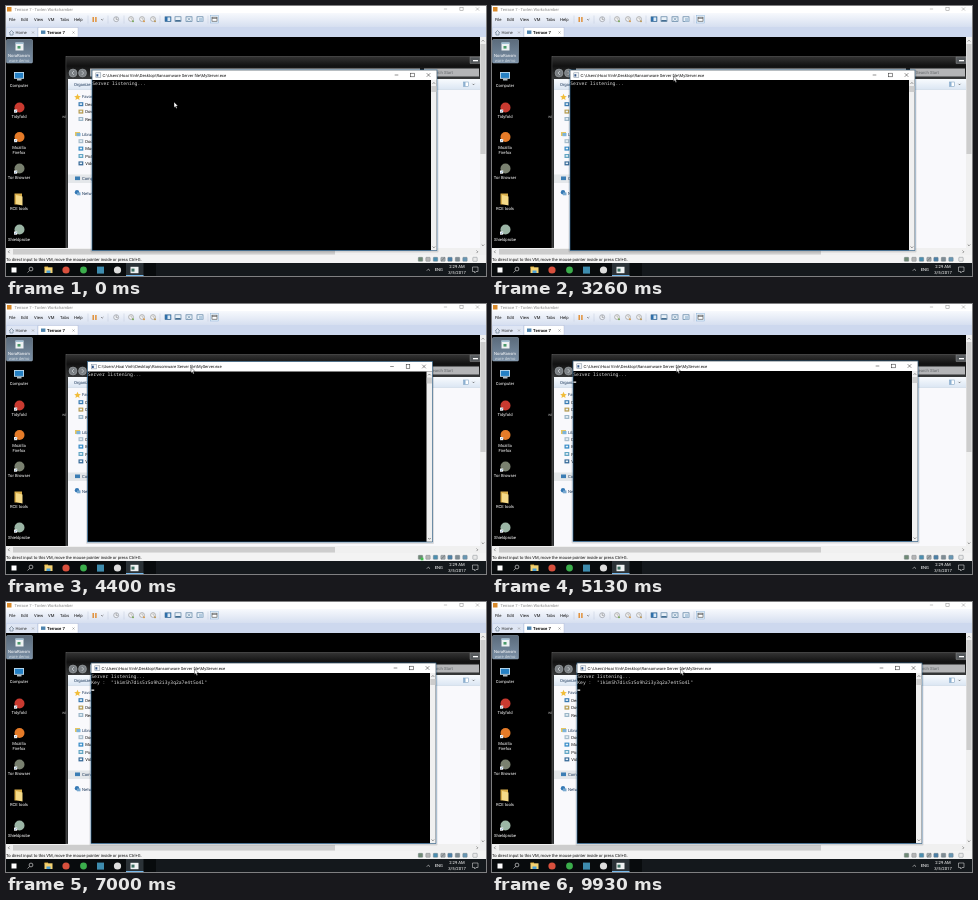
Recreate the animation shown at these times as an HTML page. Size 480 px wide and 270 px high, loop 10 s.

```html
<!DOCTYPE html>
<html lang="en">
<head>
<meta charset="utf-8">
<title>Server console on a virtual desktop</title>
<style>
  html, body { margin: 0; width: 100%; height: 100%; overflow: hidden; background: #000; }
  svg { display: block; width: 100vw; height: 100vh; }
  text { font: 4.2px Roboto, sans-serif; text-rendering: geometricPrecision; white-space: pre; }
  .mono { font: 4.72px "Noto Sans Mono", monospace; }
</style>
</head>
<body>
<svg id="stage" viewBox="0 0 480 270">
  <defs>
    <linearGradient id="glass" x2="0" y2="1">
      <stop offset="0" stop-color="#333"/>
      <stop offset=".4" stop-color="#111"/>
      <stop offset="1" stop-color="#3a3c3d"/>
    </linearGradient>
    <linearGradient id="menu" x2="0" y2="1">
      <stop offset="0" stop-color="#f7f9fd"/>
      <stop offset="1" stop-color="#d6dff0"/>
    </linearGradient>
    <linearGradient id="bar" x2="0" y2="1">
      <stop offset="0" stop-color="#f8fbfe"/>
      <stop offset="1" stop-color="#dbe6f3"/>
    </linearGradient>
    <linearGradient id="picked" x2="0" y2="1">
      <stop offset="0" stop-color="#5b6b7b"/>
      <stop offset="1" stop-color="#7b90a6"/>
    </linearGradient>
  </defs>
</svg>
<script>
const LOOP = 10000;
const stage = document.getElementById('stage');

function add(parent, tag, attrs, content) {
  const node = document.createElementNS('http://www.w3.org/2000/svg', tag);
  for (const key in attrs) node.setAttribute(key, attrs[key]);
  if (content) node.textContent = content;
  return parent.appendChild(node);
}
const rect = (p, x, y, width, height, fill, more) =>
  add(p, 'rect', { x, y, width, height, fill, ...more });
const dot = (p, cx, cy, r, fill, more) => add(p, 'circle', { cx, cy, r, fill, ...more });
const line = (p, d, stroke, width = 0.6, fill = 'none') =>
  add(p, 'path', { d, stroke, fill, 'stroke-width': width });
const label = (p, x, y, content, fill = '#111', more) =>
  add(p, 'text', { x, y, fill, ...more }, content);
const centred = (p, x, y, content, fill) => label(p, x, y, content, fill, { 'text-anchor': 'middle' });
const cross = (p, x, y, r, stroke, width) =>
  line(p, `M${x - r} ${y - r}l${2 * r} ${2 * r}m0 ${-2 * r}l${-2 * r} ${2 * r}`, stroke, width);

function windowButtons(p, x, y, gap, r, stroke) {
  line(p, `M${x - r} ${y}h${2 * r}`, stroke, 0.5);
  rect(p, x + gap - r, y - r, 2 * r, 2 * r, 'none', { stroke, 'stroke-width': 0.5 });
  cross(p, x + 2 * gap, y, r, stroke, 0.5);
}

function folder(p, x, y, w, h) {
  rect(p, x, y, w * 0.45, 1.5, '#d6a534');
  rect(p, x, y + 0.8, w, h - 0.8, '#f3d171');
}

function drawHost() {
  const g = add(stage, 'g', {});
  rect(g, 0, 0, 480, 270, '#fff');
  rect(g, 1, 1, 4.5, 4.5, '#d98a2b');
  label(g, 8.5, 4.8, 'Terrace 7 - Tovlen Workchamber', '#888', { style: 'font-size:4.1px' });
  windowButtons(g, 439.5, 3, 16, 1.6, '#888');

  rect(g, 0, 7, 480, 14, 'url(#menu)');
  [[3, 'File'], [15, 'Edit'], [28, 'View'], [42, 'VM'], [54, 'Tabs'], [68, 'Help']]
    .forEach(([x, name]) => label(g, x, 15.2, name));

  [82, 102, 118, 154, 202].forEach(x => line(g, `M${x} 9.5v8`, '#b9c3d6', 0.4));
  rect(g, 86.5, 11, 1.4, 5, '#e08a2c');
  rect(g, 89.2, 11, 1.4, 5, '#e08a2c');
  line(g, 'M95 13l1.2 1.2 1.2-1.2', '#555');
  dot(g, 110.2, 13.2, 2.5, '#eef1f6', { stroke: '#8b8f97', 'stroke-width': 0.6 });
  line(g, 'M110.2 11.2v2.2h1.6', '#666', 0.5);
  [125, 136, 147].forEach((x, i) => {
    dot(g, x, 13, 2.4, '#f6f6f6', { stroke: '#8b8b8b', 'stroke-width': 0.6 });
    line(g, `M${x} 11.5v1.6h1.4`, '#777', 0.4);
    dot(g, x + 2, 15.2, 1, ['#78a857', '#d89a4c', '#b99757'][i]);
  });
  [162, 172, 183, 194].forEach((x, i) => {
    rect(g, x - 3, 10.8, 6, 4.8, i ? '#e9f1f8' : '#2a6fae', { stroke: '#456e92', 'stroke-width': 0.6 });
    if (i === 0) rect(g, x - 0.5, 11.4, 2.8, 3.6, '#dbe9f5');
    if (i === 1) rect(g, x - 2.7, 14, 5.4, 1.4, '#456e92');
    if (i === 2) cross(g, x, 13.2, 1.5, '#456e92', 0.5);
    if (i === 3) rect(g, x - 1, 12, 4, 3.6, '#b4cbdf');
  });
  rect(g, 204.5, 9.6, 8, 7.4, '#e3eef8', { stroke: '#78a6cf', 'stroke-width': 0.4 });
  rect(g, 206, 11.2, 5, 4, '#fff', { stroke: '#444', 'stroke-width': 0.6 });
  line(g, 'M206 12.4h5', '#444');

  rect(g, 0, 21, 480, 10, '#cdd8ee');
  rect(g, 1, 22, 30, 9, '#dfe6f4');
  rect(g, 32, 21.5, 40, 9.5, '#fff', { stroke: '#a9b6cf', 'stroke-width': 0.4 });
  line(g, 'M3 27l2.5-2.5L8 27M4 26.5v2.5h3v-2.5', '#5a6f80');
  label(g, 9.5, 28, 'Home', '#333');
  cross(g, 27, 26.5, 1, '#888', 0.5);
  rect(g, 35, 24.5, 4.4, 3.4, '#4d83ad');
  label(g, 41, 28, 'Terrace 7', '#111', { style: 'font-weight:bold' });
  cross(g, 67.5, 26.5, 1, '#777', 0.5);

  rect(g, 0, 31, 474, 211, '#000');
}

function drawDesktop() {
  const g = add(stage, 'g', {});
  rect(g, 0.5, 33.5, 26, 23.5, 'url(#picked)', { stroke: '#9fb2c4', 'stroke-width': 0.5, rx: 1 });
  rect(g, 9.5, 36.5, 8, 8, '#eef1f3');
  rect(g, 9.5, 36.5, 8, 1.3, '#8fb4cc');
  rect(g, 11.5, 40, 3, 2.6, '#4b9a6a');
  centred(g, 13, 51, 'NoraRansm', '#fff');
  centred(g, 13, 55.7, 'ware demo', '#cfd8df');

  rect(g, 8, 66, 10, 6.8, '#bcd9ed');
  rect(g, 8.9, 66.9, 8.2, 5, '#2580c4');
  rect(g, 11, 73, 4.5, 1.5, '#b0bbc2');
  centred(g, 13, 81.3, 'Computer', '#fff');

  const shortcut = (y, color) => {
    dot(g, 13.5, y, 5, color);
    rect(g, 8, y + 2, 3.2, 3.2, '#f4f4f4');
    line(g, `M8.7 ${y + 4.5}l1.8-1.8`, '#2467a8');
  };
  shortcut(101.5, '#c93a30');
  centred(g, 13, 112.3, 'Tidyfold', '#fff');
  shortcut(131, '#e57b28');
  centred(g, 13, 142.6, 'Mozilla', '#fff');
  centred(g, 13, 147.8, 'Firefox', '#fff');
  shortcut(162.5, '#79806f');
  centred(g, 13, 173.4, 'Tor Browser', '#fff');
  rect(g, 8.5, 187.5, 7.5, 11, '#d9ae4b');
  add(g, 'path', { d: 'M10 189l6.5 1.5v9l-6.5-1.5z', fill: '#f5da88' });
  centred(g, 13, 204.4, 'RCE tools', '#fff');
  shortcut(223.5, '#9bb5a5');
  centred(g, 13, 234.8, 'Shieldprobe', '#fff');
  label(g, 56, 112.3, 'wi', '#aaa');
}

function drawExplorer() {
  const g = add(stage, 'g', {});
  rect(g, 60, 50.5, 414, 191.5, '#2c2e2f', { stroke: '#777', 'stroke-width': 0.5 });
  rect(g, 60.3, 50.8, 413.7, 23, 'url(#glass)');
  [67, 76.5].forEach(x => {
    dot(g, x, 67, 4, '#7b8084', { stroke: '#a5a9ac', 'stroke-width': 0.5 });
    line(g, x < 70 ? 'M68 65l-2 2 2 2' : 'M75.7 65l2 2-2 2', '#d5d9dc', 0.7);
  });
  rect(g, 84, 62.5, 330, 8, '#b4b5b7');
  rect(g, 418, 62.5, 55, 8, '#b4b5b7');
  label(g, 424, 67.8, 'Search Start', '#66696c');
  rect(g, 464, 51, 10, 6.5, '#54585b', { stroke: '#999', 'stroke-width': 0.4 });
  rect(g, 467, 54, 5, 1.3, '#fff');

  rect(g, 62, 73, 412, 169, '#f9f9fc');
  rect(g, 62, 73, 412, 10.5, 'url(#bar)');
  line(g, 'M62 83.5h412', '#b9c9da', 0.4);
  label(g, 68, 80, 'Organize', '#1e395b');
  rect(g, 457.5, 76, 5, 4.5, '#fff', { stroke: '#6d93b8', 'stroke-width': 0.5 });
  rect(g, 457.5, 76, 2, 4.5, '#8cb0d1');
  line(g, 'M466.5 77.8l1 1 1-1', '#333');

  rect(g, 62, 168.5, 70, 8.5, '#e4e7ea');
  add(g, 'path', { d: 'M71.5 87.8l1 2.2 2.3.2-1.8 1.5.6 2.3-2.1-1.2-2.1 1.2.6-2.3-1.8-1.5 2.3-.2z', fill: '#f1bd3a' });
  rect(g, 69, 126, 5, 4, '#e5c663');
  rect(g, 70.5, 127, 4, 3.2, '#7db4da');
  rect(g, 69, 170.5, 5, 3.6, '#3b7db4');
  dot(g, 71, 186.3, 2.2, '#3579b5');
  rect(g, 71, 186.5, 3.5, 2.8, '#77a8cf');
  [['Favorites', 92.3], ['Libraries', 129.8], ['Computer', 174.4], ['Network', 188.8]]
    .forEach(([name, y]) => label(g, 76, y, name, '#1e395b'));
  const entries = (top, names, colors) => names.forEach((name, i) => {
    const y = top + i * 7.4;
    rect(g, 72.5, y - 3.8, 4.8, 4, colors[i]);
    rect(g, 73.7, y - 2.7, 2.4, 1.6, '#e9f2f8');
    label(g, 79.2, y, name);
  });
  entries(100, ['Desktop', 'Downloads', 'Recent Places'], ['#397bb2', '#b79c50', '#9bb6c8']);
  entries(137, ['Documents', 'Music', 'Pictures', 'Videos'], ['#a8bdcc', '#348ac6', '#62a5c3', '#376a98']);
}

function drawFrameBars() {
  const g = add(stage, 'g', {});
  rect(g, 474, 31, 6, 211, '#f0f0f0');
  rect(g, 474.4, 38, 5.2, 110, '#cdcdcd');
  line(g, 'M475.7 35.5l1.3-1.3 1.3 1.3M475.7 238.5l1.3 1.3 1.3-1.3', '#555');
  rect(g, 0, 242, 480, 7, '#f0f0f0');
  rect(g, 7, 243, 322, 5.5, '#cdcdcd');
  line(g, 'M3.6 244.5l-1.3 1.3 1.3 1.3M470.5 244.5l1.3 1.3-1.3 1.3', '#555');

  rect(g, 0, 249, 480, 8, '#f3f3f3');
  label(g, 0, 254.8, 'To direct input to this VM, move the mouse pointer inside or press Ctrl+G.');
  const colors = ['#6f8a75', '#b5b5b5', '#4b8fb1', '#a1a8ac', '#4a80a8', '#7e8c94', '#6797b4', '#e9e9e9'];
  [414.5, 422, 429.5, 437, 444, 451.5, 459, 469].forEach((x, i) =>
    rect(g, x - 2.2, 251.3, 4.4, 4, colors[i], { stroke: '#6b747a', 'stroke-width': 0.4, rx: 0.6 }));
  line(g, 'M435.2 255l3.8-3.6', '#555', 0.5);

  rect(g, 0, 257, 150, 13, '#080b0d');
  rect(g, 150, 257, 330, 13, '#14181c');
  rect(g, 5.5, 261.5, 5, 5, '#fff');
  dot(g, 25, 263, 1.9, 'none', { stroke: '#eee', 'stroke-width': 0.6 });
  line(g, 'M23.6 264.5l-2 2', '#eee');
  folder(g, 38.5, 260.5, 8, 6.5);
  rect(g, 40.5, 264.5, 4, 2.5, '#4ba0d6');
  dot(g, 60, 264, 3.6, '#d8503d');
  dot(g, 77.5, 264, 3.4, '#3bae4c');
  rect(g, 91, 260.6, 7, 7, '#3e8cae');
  dot(g, 111.5, 264, 3.6, '#ddd');
  rect(g, 120, 257, 17.5, 13, '#2b3237');
  rect(g, 120, 269, 17.5, 1, '#76b9ed');
  rect(g, 124.5, 260.8, 8, 6.4, '#f0f2f3');
  rect(g, 125.5, 262.6, 3, 3, '#3c6f62');
  line(g, 'M420.8 264.7l1.6-1.6 1.6 1.6', '#eee');
  label(g, 428.7, 265.4, 'ENG', '#fff');
  centred(g, 451, 262.4, '2:29 AM', '#fff');
  centred(g, 451, 268.4, '3/5/2017', '#fff');
  line(g, 'M466.5 261h5.5v4.5h-2l-1.3 1.5v-1.5h-2.2z', '#eee', 0.5);
  return rect(g, 414.8, 253.7, 2.6, 2.6, '#3fc14c');
}

function drawConsole() {
  const g = add(stage, 'g', {});
  rect(g, -1.5, -0.5, 348, 183, '#000', { opacity: 0.12, rx: 1 });
  rect(g, 0, 0, 345, 180.5, '#000', { stroke: '#3679ad', 'stroke-width': 0.6 });
  rect(g, 0.3, 0.3, 344.4, 9.7, '#fff');
  rect(g, 3.8, 2.8, 5, 4.6, '#f4f6f8', { stroke: '#7b8a99', 'stroke-width': 0.5 });
  rect(g, 4.4, 4.2, 1.9, 2.3, '#35588a');
  label(g, 10.5, 6.8, String.raw`C:\Users\Hoai Vinh\Desktop\Ransomware Server file\MyServer.exe`, '#111',
    { style: 'font-size:4.15px' });
  windowButtons(g, 304.5, 5, 16, 1.8, '#222');
  rect(g, 339, 10, 5.7, 170.2, '#f0f0f0');
  rect(g, 339.3, 16, 5.1, 6, '#cdcdcd');
  line(g, 'M340.6 13.8l1.3-1.3 1.3 1.3M340.6 176.5l1.3 1.3 1.3-1.3', '#444');
  const print = (y, words) => label(g, 0.3, y, words, '#ddd', { class: 'mono' });
  print(14.9, 'Server listening...');
  const key = print(20.9, 'Key :  "1kimSh7dis5r5o9h2i3y3q2a7e4t5o4l"');
  const caret = rect(g, 0.4, 20.5, 2.8, 1.3, '#eee');
  return { g, key, caret };
}

drawHost();
drawDesktop();
drawExplorer();
const diskLight = drawFrameBars();
const terminal = drawConsole();
const pointer = line(stage, 'M0 0v5.6l1.3-1.2.9 2.1 1-.4-.9-2.1h1.7z', '#000', 0.4, '#fff');

// Each entry: start time, window left, window top.
const windowSteps = [
  [0, 86, 64], [3200, 82, 64.5], [3260, 78, 64], [3330, 78, 63], [3400, 79, 61],
  [3460, 79.5, 60], [3530, 80, 59], [3660, 81, 58.5], [3930, 82, 58], [4400, 81.5, 57.5],
  [4600, 81, 57], [5400, 83, 59], [5460, 84, 60], [5530, 85, 61]
];
const caretFlips = [533, 1066, 1600, 2133, 2666, 3200, 3730, 4400, 4800, 5333, 5860,
  6400, 6930, 7460, 8530, 9060, 9600];
const lightFlips = [260, 660, 930, 1130, 1460, 1730, 2330, 2600, 3330, 3600, 3930, 4200,
  4400, 4730, 5060, 5130, 5460, 5530, 6200, 6460, 6730, 7000, 7530, 7800, 8530, 8660];
const KEY_TIME = 6460;
const GRIP = [103.5, 6];

const isOn = (flips, t) => flips.filter(time => time <= t).length % 2 === 1;
const show = (node, on) => node.setAttribute('visibility', on ? 'visible' : 'hidden');
const move = (node, x, y) => node.setAttribute('transform', `translate(${x} ${y})`);

function render(t) {
  const [, x, y] = windowSteps.filter(step => step[0] <= t).pop();
  move(terminal.g, x, y);

  const approach = Math.min(1, Math.max(0, (t - 2330) / 400));
  const ease = approach * approach * (3 - 2 * approach);
  const [gripX, gripY] = [x + GRIP[0], y + GRIP[1]];
  move(pointer, 168 + (gripX - 168) * ease, 96 + (gripY - 96) * ease);

  const hasKey = t >= KEY_TIME;
  show(terminal.key, hasKey);
  show(terminal.caret, isOn(caretFlips, t));
  terminal.caret.setAttribute('y', hasKey ? 26.5 : 20.5);
  show(diskLight, isOn(lightFlips, t));
}

function tick() {
  render(performance.now() % LOOP);
  requestAnimationFrame(tick);
}
tick();
</script>
</body>
</html>
```
